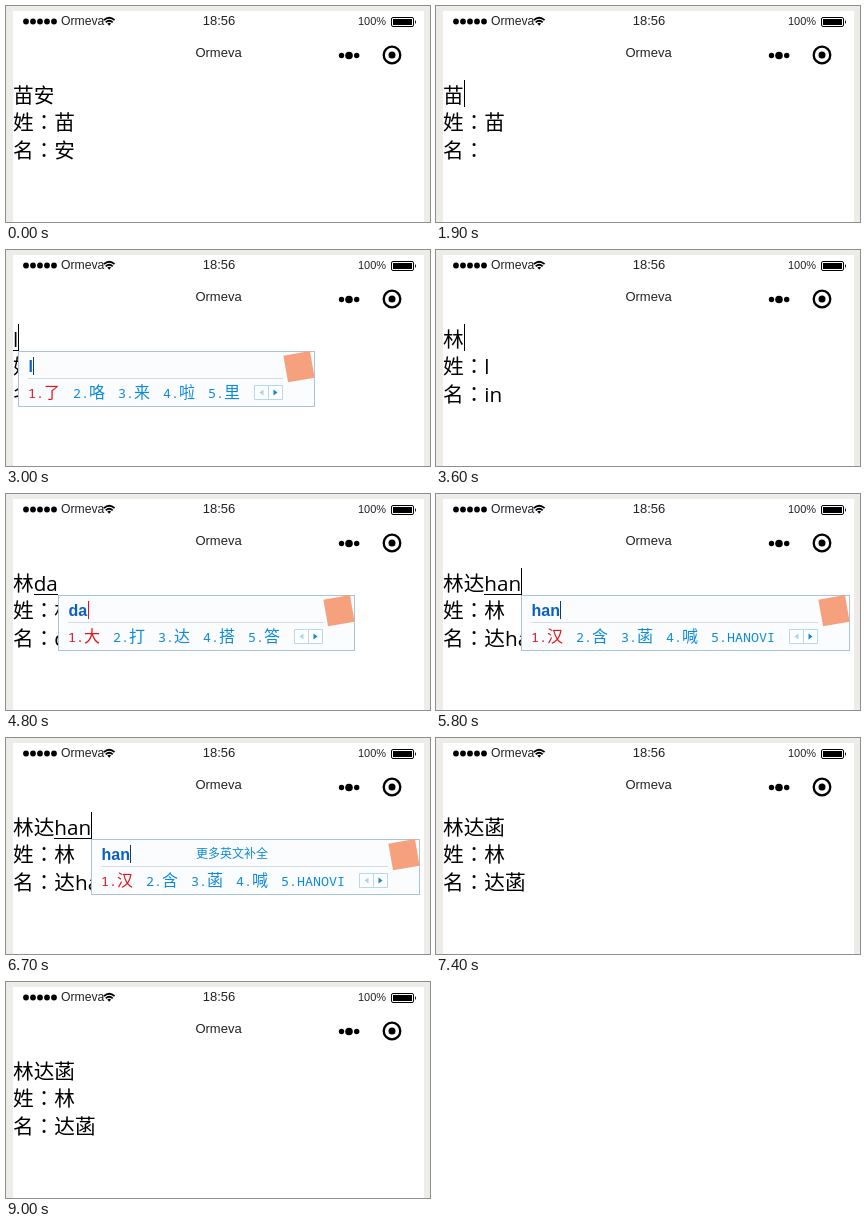
An HTML page for the animation above (9100 ms loop, 424 px wide and 216 px high).

```html
<!DOCTYPE html>
<html lang="zh-CN">
<head>
<meta charset="utf-8">
<title>姓名输入</title>
<style>
  html, body { margin: 0; width: 100%; height: 100%; overflow: hidden; background: #edece8; }
  svg { display: block; width: 424px; height: 216px; }
  text { white-space: pre; }
  .bar { font-family: "Liberation Sans", Arial, sans-serif; fill: #222; }
  .row { font: 20.67px "Open Sans", "Noto Sans CJK SC", sans-serif; fill: #000; }
  .colon { font-family: "Noto Sans CJK JP", sans-serif; }
  .typed { font: bold 16px "Liberation Sans", Arial, sans-serif; fill: #0a5fc2; }
  .key { font: 13.33px "Noto Sans Mono", monospace; }
  .han { font: 300 16px "Noto Sans CJK SC", sans-serif; }
  .more { font: 12px "Noto Sans CJK SC", sans-serif; fill: #0d8ade; }
</style>
</head>
<body>
<svg viewBox="0 0 424 216">
  <rect width="424" height="216" fill="#edece8"/>
  <rect x="7" y="5" width="411" height="211" fill="#fff"/>

  <g id="dots"></g>
  <text class="bar" x="55" y="19" font-size="12.2">Ormeva</text>
  <g fill="none" stroke="#000" stroke-width="1.8">
    <path d="M97.8 14.2Q103.2 9.4 108.6 14.2M99.7 16.4Q103.2 13.2 106.7 16.4"/>
    <path d="M101.3 17.6Q103.2 16 105.1 17.6L103.2 19.8Z" fill="#000" stroke="none"/>
  </g>
  <text class="bar" x="213" y="19" font-size="13" text-anchor="middle">18:56</text>
  <text class="bar" x="352" y="19" font-size="11">100%</text>
  <rect x="385.5" y="11.5" width="22" height="9" rx="1.5" fill="none" stroke="#000"/>
  <rect x="387" y="13" width="19" height="6" fill="#000"/>
  <path d="M409 14Q411 16 409 18Z"/>

  <text class="bar" x="212.5" y="51" font-size="13" text-anchor="middle">Ormeva</text>
  <circle cx="335.5" cy="49.5" r="2.7"/>
  <circle cx="343" cy="49.5" r="3.8"/>
  <circle cx="350.7" cy="49.5" r="2.7"/>
  <circle cx="386" cy="49" r="8.3" fill="none" stroke="#000" stroke-width="2.3"/>
  <circle cx="386" cy="49" r="3.5"/>

  <text id="input" class="row" x="7" y="96.5"></text>
  <rect id="underline" y="100" height="1"/>
  <rect id="caret" y="74" width="1" height="27"/>
  <g class="row">
    <text x="7" y="124">姓</text><text class="colon" lang="ja" x="27.67" y="124">：</text>
    <text id="family" x="48.33" y="124"></text>
    <text x="7" y="151.5">名</text><text class="colon" lang="ja" x="27.67" y="151.5">：</text>
    <text id="given" x="48.33" y="151.5"></text>
  </g>

  <g id="popup">
    <rect id="panel" x=".5" y="101.5" height="55" fill="#fbfcfe" stroke="#abc3d6"/>
    <text id="typed" class="typed" x="10.5" y="122"></text>
    <rect id="typedCaret" y="107" width="1" height="18"/>
    <text id="more" class="more" x="105" y="119.5">更多英文补全</text>
    <rect id="rule" x="10" y="128" height="1" fill="#d3dce4"/>
    <g id="choices"></g>
    <g id="right">
      <path d="M-60.5 135.5h28v14h-28zM-46.5 135.5v14" fill="#fdfeff" stroke="#b9d8ee"/>
      <path d="M-51.5 139.5v6l-4-3z" fill="#a9d3f2"/>
      <path d="M-41.5 139.5v6l4-3z" fill="#1686d9"/>
      <rect x="-13.5" y="-13.5" width="27" height="27" fill="#f6a17d" transform="translate(-16 116.7) rotate(-10)"/>
    </g>
  </g>
</svg>
<script>
const LOOP = 9100, LEFT = 7, EM = 20.67;
const el = id => document.getElementById(id);

el('dots').innerHTML = [0, 1, 2, 3, 4]
  .map(i => `<circle cx="${20 + i * 7}" cy="15.5" r="2.9"/>`).join('');

// at: start time, text: committed, typed: being composed, end: caret x
const states = [
  { at: 0, text: '苗安', end: 48 },
  { at: 1900, text: '苗', end: 28 },
  { at: 2300, text: '', end: 7 },
  { at: 3000, text: '', typed: 'l', end: 12, words: '了咯来啦里' },
  { at: 3100, text: '', typed: 'li', end: 17, words: '里理力离立' },
  { at: 3200, text: '', typed: 'lin', end: 31, words: '林临邻淋琳' },
  { at: 3600, text: '林', end: 28, bound: 'lin' },
  { at: 3700, text: '林', end: 28 },
  { at: 4200, text: '林', typed: 'd', end: 40, words: '的大都到对', red: true },
  { at: 4300, text: '林', typed: 'da', end: 52, words: '大打达搭答', red: true },
  { at: 5100, text: '林达', end: 48 },
  { at: 5500, text: '林达', typed: 'h', end: 61, words: '好还会后号', red: true },
  { at: 5600, text: '林达', typed: 'ha', end: 73, words: '哈蛤铪好还' },
  { at: 5700, text: '林达', typed: 'han', end: 85, words: '汉含菡喊汗' },
  { at: 5800, text: '林达', typed: 'han', end: 85, words: '汉含菡喊', latin: 'HANOVI' },
  { at: 7000, text: '林达菡', end: 69 }
];
const caretToggles = [1000, 1400, 1900, 2700, 3000, 4100, 4200, 4800,
  5100, 6200, 6700, 7400, 7900, 8300, 8800, 9000];

const show = (id, on) => el(id).setAttribute('visibility', on ? 'inherit' : 'hidden');
const set = (id, name, value) => el(id).setAttribute(name, value);

function choice(word, i) {
  const x = 10 + i * 45, fill = i ? '#0d8ade' : '#e0141a';
  const kind = word.length > 1 ? 'key' : 'han';
  return `<g fill="${fill}"><text class="key" x="${x}" y="147.5">${i + 1}.</text>` +
    `<text class="${kind}" x="${x + 16}" y="148">${word}</text></g>`;
}

function drawPopup(state) {
  const words = [...state.words];
  if (state.latin) words.push(state.latin);
  const width = state.latin ? 329 : 297;
  set('popup', 'transform', `translate(${state.end} 0)`);
  set('panel', 'width', width - 1);
  set('rule', 'width', width - 42);
  set('right', 'transform', `translate(${width} 0)`);
  el('typed').textContent = state.typed;
  set('typedCaret', 'x', Math.round(11 + el('typed').getComputedTextLength()));
  set('typedCaret', 'fill', state.red ? '#e0141a' : '#143a66');
  el('choices').innerHTML = words.map(choice).join('');
}

function drawState(state) {
  const typed = state.typed || '';
  const value = state.bound || state.text + typed;
  const start = LEFT + state.text.length * EM;
  el('input').textContent = state.text + typed;
  el('family').textContent = value.slice(0, 1);
  el('given').textContent = value.slice(1);
  set('caret', 'x', state.end);
  set('underline', 'x', Math.round(start));
  set('underline', 'width', typed ? state.end - Math.round(start) : 0);
  show('popup', typed);
  if (typed) drawPopup(state);
}

let current;
function render(time) {
  const state = states.filter(s => s.at <= time).pop();
  if (state !== current) drawState(current = state);
  show('caret', caretToggles.filter(t => t <= time).length % 2);
  show('more', state.latin && time >= 6300);
}

const began = performance.now();
function tick() {
  render((performance.now() - began) % LOOP);
  requestAnimationFrame(tick);
}
tick();
</script>
</body>
</html>
```
